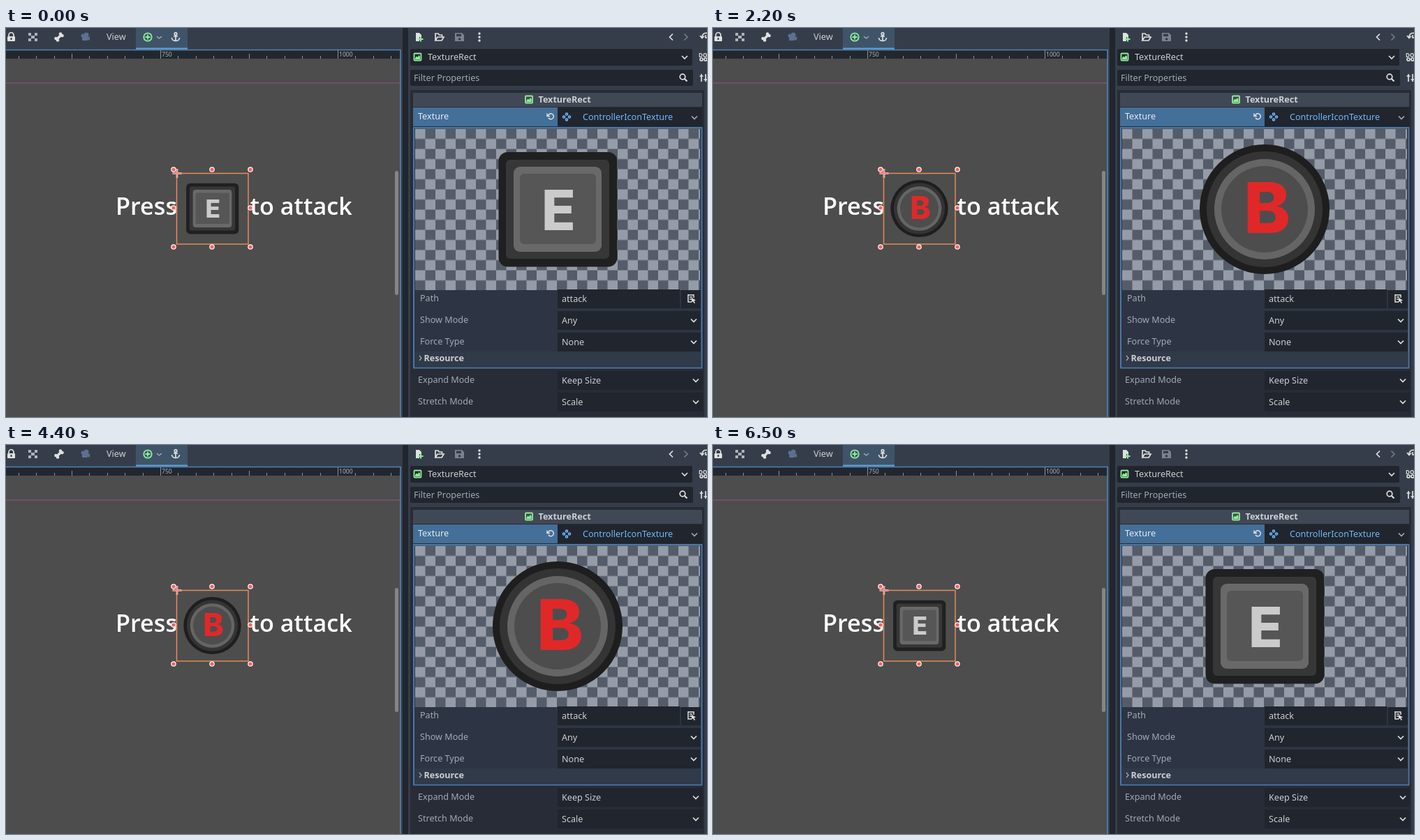
An HTML page for the animation above (7800 ms loop, 1004 by 558 pixels).

```html
<!DOCTYPE html>
<html lang="en">
<head>
<meta charset="utf-8">
<title>Controller icon texture</title>
<style>
  html, body { margin: 0; width: 100%; height: 100%; overflow: hidden; background: #363d4a; }
  svg { display: block; width: 1004px; height: 558px; }
  text { font: 12.6px "Noto Sans", sans-serif; fill: #cdcfd3; white-space: pre; }
  .dim { fill: #a3a9b4; }
  .bold { font-weight: 700; }
  .blue { fill: #70bafa; }
  .tick { font-size: 8.6px; fill: #b0b3b9; }
  .tiny { font-size: 8px; font-weight: 700; fill: #e0e0e0; }
  .game { font: 600 34.2px "Open Sans", sans-serif; fill: #fff; }
  .glyph { font-family: Inter, sans-serif; font-weight: 800; text-anchor: middle; }
  .line { fill: none; stroke: #e0e0e0; stroke-width: 1.7; }
  .field { fill: #20252e; }
</style>
</head>
<body>
<svg viewBox="0 0 1004 558">
  <defs>
    <pattern id="checks" x="586" y="144.5" width="29" height="29" patternUnits="userSpaceOnUse">
      <rect width="29" height="29" fill="#545c69"/>
      <path d="M0 0h14.5v29h14.5v-14.5H0z" fill="#969ca7"/>
    </pattern>
    <!-- Both icons are centred on 0,0 at preview size -->
    <g id="key">
      <rect x="-84.5" y="-82" width="170" height="164.500" rx="13" fill="#202020"/>
      <rect x="-74" y="-71" width="148" height="142" rx="6" fill="#373737"/>
      <rect x="-63" y="-61" width="126" height="122" rx="9" fill="#696969"/>
      <rect x="-54" y="-51" width="109" height="101" rx="6" fill="#565656"/>
      <text class="glyph" x="1.5" y="30" style="font-size:80px;fill:#cbcbcb">E</text>
    </g>
    <g id="pad">
      <circle r="93" fill="#1e1e1e"/>
      <circle r="83" fill="#343434"/>
      <circle r="72" fill="#656565"/>
      <circle r="62" fill="#4d4d4d"/>
      <text class="glyph" x="3.5" y="34" style="font-size:101px;fill:#e12828">B</text>
    </g>
    <g id="image">
      <rect x="-5" y="-5" width="10" height="10" rx="1" fill="none" stroke="#8eef97" stroke-width="1.8"/>
      <path d="M-3.5 3.5v-2l2-2.5 1.5 1.5 2-3 1.5 2v4z" fill="#8eef97"/>
    </g>
    <path id="down" class="line" d="M-4-2 0 2 4-2"/>
  </defs>

  <!-- Viewport -->
  <rect width="568" height="558" fill="#363d4a"/>
  <rect x="186" width="74" height="31" fill="#3f5469"/>
  <path d="M186 29.5h74" stroke="#64a5dc" stroke-width="2"/>
  <rect y="31" width="566" height="527" fill="#4d4d4d"/>
  <rect y="31" width="565" height="13" fill="#22272f"/>
  <path id="ticks" stroke="#8e9299" fill="none"/>
  <text class="tick" x="223" y="41">750</text>
  <text class="tick" x="477" y="41">1000</text>
  <path d="M0 79h564" stroke="#98508f" stroke-width="1.2"/>
  <rect x="557" y="205" width="5" height="178" rx="2.5" fill="#858585"/>
  <path d="M0 31.5h565v527" fill="none" stroke="#4d83b5" stroke-width="1.6"/>

  <!-- Viewport toolbar -->
  <rect x="2" y="12" width="11" height="7" rx="1" fill="#e0e0e0"/>
  <path class="line" d="M4 13v-3a3.5 3.5 0 0 1 7 0v3"/>
  <path d="M7.5 14v3" stroke="#363d4a" stroke-width="2"/>
  <path d="M32 7h4v4h-4zM41 7h4v4h-4zM32 15h4v4h-4zM36 11h5v4h-5zM41 15h4v4h-4z" fill="#aeb2b9"/>
  <path d="M72.5 16.5 79.5 9.5" stroke="#e0e0e0" stroke-width="3.5"/>
  <g fill="#e0e0e0">
    <circle cx="71.5" cy="15" r="2.3"/><circle cx="74" cy="17.5" r="2.3"/>
    <circle cx="78" cy="8.5" r="2.3"/><circle cx="80.5" cy="11" r="2.3"/>
  </g>
  <g fill="#5d7090">
    <circle cx="115" cy="10" r="3.5"/><circle cx="110" cy="11" r="2.5"/>
    <rect x="109" y="12" width="8" height="6" rx="1"/><path d="M116 14l4-2v6l-4-2z"/>
  </g>
  <text x="144" y="17">View</text>
  <circle cx="203" cy="13" r="5.7" fill="none" stroke="#8eef97" stroke-width="1.8"/>
  <path d="M203 9.5v7M199.5 13h7" stroke="#8eef97" stroke-width="1.8"/>
  <path d="M216 12l3.5 3 3.5-3" fill="none" stroke="#a8b0bb" stroke-width="1.3"/>
  <circle class="line" cx="243" cy="8.5" r="1.8"/>
  <path class="line" d="M243 10.5v8M240 12h6M237.5 14c0 6 11 6 11 0"/>

  <!-- Scene text, icon and selection -->
  <text class="game" x="157" y="268">Press</text>
  <text class="game" x="349.5" y="268">to attack</text>
  <g transform="translate(295.5 259) scale(.442)">
    <use href="#key" class="key"/><use href="#pad" class="pad"/>
  </g>
  <rect x="244.5" y="208.5" width="102.5" height="101.5" fill="none" stroke="#e58b59" stroke-width="1.5"/>
  <g id="handles" fill="#f65f5c" stroke="#fff" stroke-width="1.2"></g>
  <path d="M245 202v13M238.5 208.5h13" stroke="#f8c9c4" stroke-width="2.6"/>
  <path d="M245 202v13M238.5 208.5h13" stroke="#f4716c"/>

  <!-- Inspector -->
  <rect x="568" width="8" height="558" fill="#21262e"/>
  <rect x="576" width="428" height="558" fill="#363d4a"/>
  <path d="M587 7h5l3 3v3h-3v6h-5z" fill="#e0e0e0"/>
  <path d="M594 12.5v7M590.5 16h7" stroke="#8eef97" stroke-width="2"/>
  <path class="line" d="M615 18V8h4l1.5 2h4v3M615 18l3-5h9l-3 5z"/>
  <path d="M643 7h10l3 3v9h-13zM645 8.5v3.5h7V8.5zM649.5 14a1.8 1.8 0 1 0 .1 0z" fill="#7c818b" fill-rule="evenodd"/>
  <g fill="#e0e0e0"><circle cx="678" cy="8" r="1.7"/><circle cx="678" cy="13" r="1.7"/><circle cx="678" cy="18" r="1.7"/></g>
  <path class="line" d="M955 8.5 950.5 13l4.5 4.5"/>
  <path class="line" d="M971.5 8.5 976 13l-4.5 4.5" style="stroke:#757b86"/>
  <path class="line" d="M1004 7.5a5.5 5.5 0 0 0-7 5.5M994 11l3 3.5 3-3M1002 10v4h2"/>

  <rect class="field" x="579" y="30" width="404" height="24" rx="2"/>
  <use href="#image" x="589.5" y="41.5"/>
  <text x="604" y="46">TextureRect</text>
  <use href="#down" x="972" y="42"/>
  <text class="tiny" x="992" y="42">DOC</text>
  <circle class="line" cx="996" cy="45" r="2"/><circle class="line" cx="1002" cy="45" r="2"/>

  <rect class="field" x="579" y="60" width="405" height="23" rx="2"/>
  <text class="dim" x="584" y="76">Filter Properties</text>
  <circle class="line" cx="969" cy="70" r="3.8"/>
  <path class="line" d="M971.5 72.5l4 4" style="stroke-width:2.2"/>
  <path class="line" d="M996 66v11M993.5 69h5M1002 66v11M999.5 74h5"/>

  <rect x="579" y="89" width="421" height="469" fill="#272c36"/>
  <rect x="583" y="93" width="414" height="20" fill="#414855"/>
  <use href="#image" x="749" y="102.5"/>
  <text class="bold" x="762.5" y="106.5">TextureRect</text>
  <rect x="583" y="114" width="207" height="27" fill="#436f98"/>
  <text x="590" y="131" style="fill:#e6ebf0">Texture</text>
  <path class="line" d="M777 129a4 4 0 1 0 .5-5l-2 2.5M775 122.5v4h4" style="stroke-width:1.5"/>
  <rect class="field" x="790" y="114" width="207" height="27"/>
  <g fill="none" stroke="#70bafa" stroke-width="1.6">
    <circle cx="803" cy="123.5" r="1.5"/><circle cx="799" cy="127.5" r="1.5"/>
    <circle cx="807" cy="127.5" r="1.5"/><circle cx="803" cy="131.5" r="1.5"/>
  </g>
  <text class="blue" x="826" y="132">ControllerIconTexture</text>
  <use href="#down" x="986" y="128.5" opacity=".7"/>

  <rect x="584" y="143" width="412.5" height="344.5" fill="#2d3544" stroke="#4779a8" stroke-width="2"/>
  <rect x="586" y="144.5" width="408" height="231.5" fill="url(#checks)"/>
  <g transform="translate(790 260)">
    <use href="#key" class="key"/><use href="#pad" class="pad"/>
  </g>
  <g id="rows"></g>
  <rect class="field" x="967" y="376" width="28" height="26"/>
  <path class="line" d="M977 383h8v4M977 382v11h5M979 386h4M979 389h3" style="stroke-width:1.5"/>
  <path d="M982 387l6 3.5-2.5.8 1.5 3-1.5.7-1.5-3-2 1.5z" fill="#e0e0e0"/>
  <rect x="585" y="464" width="410.5" height="22.5" fill="#303a49"/>
  <path d="M592 470l3 3.5-3 3.5" fill="none" stroke="#a3a9b4" stroke-width="1.3"/>
  <text class="bold" x="598.5" y="478">Resource</text>
</svg>
<script>
const $ = id => document.getElementById(id);

// Ruler: one tick per 25 units, longer every 125
let ticks = "";
for (let i = -3; i < 19; i++) {
  const x = Math.round(94 + i * 25.4) + .5;
  const top = i % 10 === 5 ? 32 : i % 5 ? 40 : 37;
  ticks += `M${x} ${top}V44`;
}
$("ticks").setAttribute("d", ticks);

const xs = [240, 295, 350], ys = [203, 258, 314];
$("handles").innerHTML = ys.flatMap((y, r) => xs.map((x, c) =>
  r === 1 && c === 1 ? "" : `<circle cx="${x}" cy="${y}" r="3.2"/>`)).join("");

// Label, value, label x, baseline, field width, has a dropdown arrow
const rows = [
  ["Path", "attack", 593, 392, 175, false],
  ["Show Mode", "Any", 593, 423, 205, true],
  ["Force Type", "None", 593, 454, 205, true],
  ["Expand Mode", "Keep Size", 590, 509, 208, true],
  ["Stretch Mode", "Scale", 590, 540, 208, true]
];
$("rows").innerHTML = rows.map(([label, value, x, y, w, menu]) => `
  <rect class="field" x="790" y="${y - 17}" width="${w}" height="27"/>
  <text class="dim" x="${x}" y="${y}">${label}</text>
  <text x="796" y="${y + .7}">${value}</text>
  ${menu ? `<use href="#down" x="${780 + w}" y="${y - 3.5}"/>` : ""}`).join("");

// The gamepad button is shown in these spans of the loop, in ms
const LOOP = 7800, padSpans = [[1100, 3100], [4400, 6500]];
const show = (name, on) => document.querySelectorAll("." + name)
  .forEach(el => el.style.visibility = on ? "visible" : "hidden");

function draw() {
  const t = performance.now() % LOOP;
  const pad = padSpans.some(([from, to]) => t >= from && t < to);
  show("pad", pad);
  show("key", !pad);
  requestAnimationFrame(draw);
}
draw();
</script>
</body>
</html>
```
